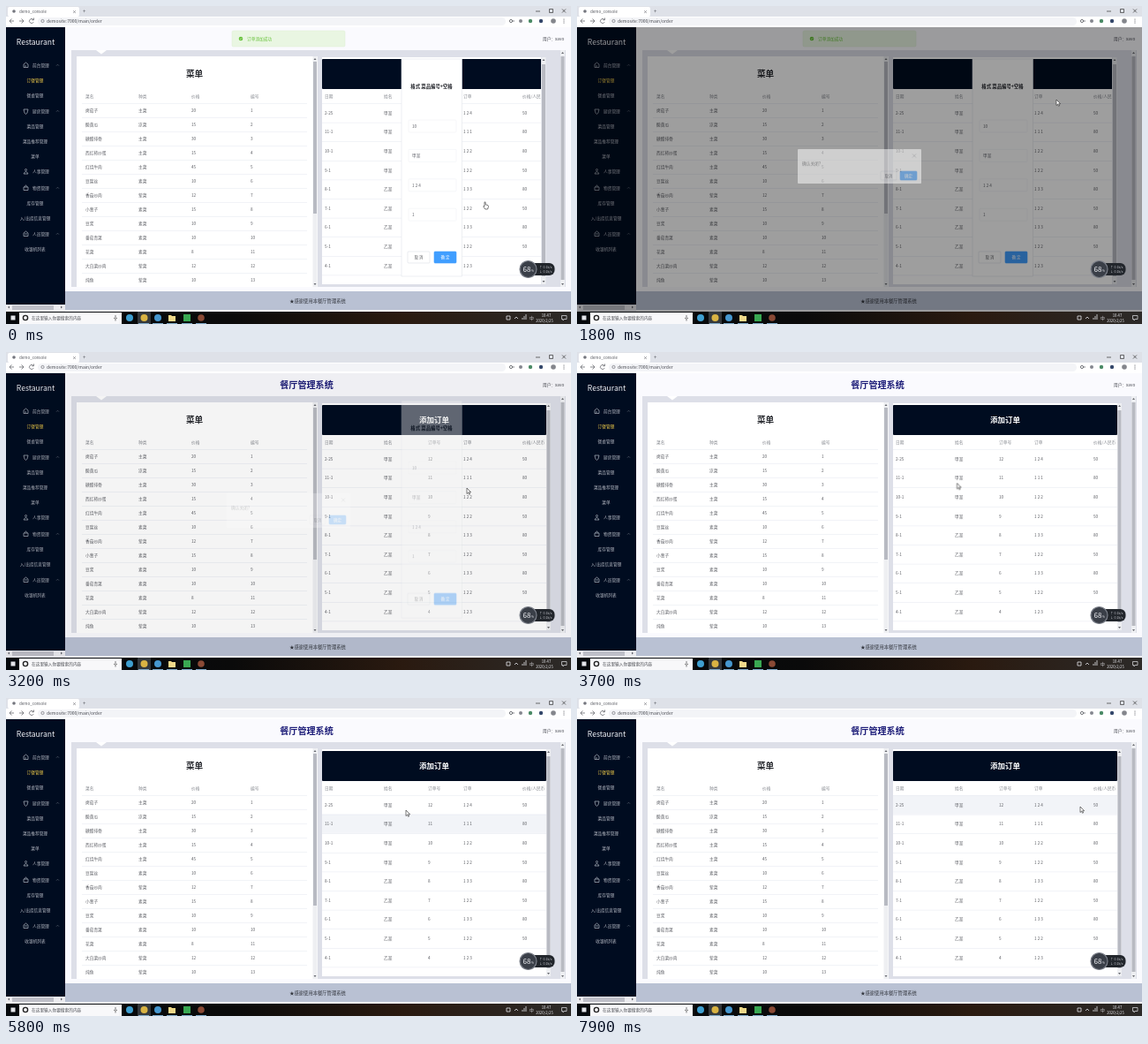
Write an HTML page that moves like this. It is 640x360 px and loops after 8 s.

```html
<!DOCTYPE html>
<html lang="zh-CN">
<head>
<meta charset="utf-8">
<style>
html, body { margin: 0; width: 100%; height: 100%; overflow: hidden; background: #fafafe; }
svg { display: block; width: 640px; height: 360px; }
text { font-family: "Noto Sans CJK SC", "Noto Sans CJK", "Noto Sans", sans-serif; white-space: pre; }
#notice, #form, #narrow, #shade, #confirm, #cursor, #arrow, #hand, #hoverL, #hoverR {
  animation: 8s linear infinite;
}
#notice { animation-name: notice; }
#form { animation-name: form; }
#narrow { animation-name: narrow; animation-timing-function: step-end; }
#shade { animation-name: shade; mix-blend-mode: multiply; }
#confirm { animation-name: confirm; }
#cursor { animation-name: move; animation-timing-function: ease-in-out; }
#arrow { animation-name: arrow; animation-timing-function: step-end; }
#hand { animation-name: hand; animation-timing-function: step-end; }
#hoverL { animation-name: hoverL; }
#hoverR { animation-name: hoverR; }

@keyframes notice {
  0%, 28% { opacity: 1; transform: none; }
  32%, 100% { opacity: 0; transform: translateY(-12px); }
}
@keyframes form {
  0%, 38.2% { opacity: 1; transform: none; }
  41.2%, 100% { opacity: 0; transform: translateY(-8px); }
}
@keyframes narrow { 0% { opacity: 1; } 38.6%, 100% { opacity: 0; } }
@keyframes shade {
  0%, 20.5% { opacity: 0; }
  23.2%, 38.2% { opacity: 1; }
  40.2%, 100% { opacity: 0; }
}
@keyframes confirm {
  0%, 20.5% { opacity: 0; transform: translateY(-8px); }
  24.5%, 38.2% { opacity: 1; transform: none; }
  40.6%, 100% { opacity: 0; transform: translateY(-8px); }
}
@keyframes move {
  0%, 10% { transform: translate(541px, 222px); }
  20%, 24% { transform: translate(543px, 106px); }
  33%, 38.2% { transform: translate(379px, 195px); }
  40%, 42% { transform: translate(522px, 154px); }
  54%, 59% { transform: translate(174px, 133px); }
  69% { transform: translate(440px, 146px); }
  72.5% { transform: translate(453px, 127px); }
  82% { transform: translate(520px, 120px); }
  94%, 100% { transform: translate(570px, 123px); }
}
@keyframes arrow { 0% { opacity: 0; } 12% { opacity: 1; } 32.5% { opacity: 0; } 38.6%, 100% { opacity: 1; } }
@keyframes hand { 0% { opacity: 1; } 12% { opacity: 0; } 32.5% { opacity: 1; } 38.6%, 100% { opacity: 0; } }
@keyframes hoverL {
  0%, 49% { opacity: 0; transform: translateY(16px); }
  50%, 51% { opacity: 1; transform: translateY(16px); }
  51.01%, 63% { opacity: 1; transform: none; }
  65%, 100% { opacity: 0; transform: none; }
}
@keyframes hoverR {
  0%, 65.5% { opacity: 0; transform: translateY(21.6px); }
  67.5%, 72.8% { opacity: 1; transform: translateY(21.6px); }
  72.81%, 100% { opacity: 1; transform: none; }
}
</style>
</head>
<body>
<svg id="stage" viewBox="0 0 640 360"></svg>
<script>
const navy = '#000c20', wall = '#dddfe8', paper = '#ffffff';

const rect = (x, y, w, h, fill, extra = '') =>
  `<rect x="${x}" y="${y}" width="${w}" height="${h}" fill="${fill}" ${extra}/>`;
const dot = (x, y, r, fill, extra = '') =>
  `<circle cx="${x}" cy="${y}" r="${r}" fill="${fill}" ${extra}/>`;
const path = (d, stroke, width = .7, fill = 'none') =>
  `<path d="${d}" stroke="${stroke}" stroke-width="${width}" fill="${fill}"/>`;
// y is the middle of the line of text
const text = (x, y, s, size = 4.7, fill = '#64666e', extra = '') =>
  `<text x="${x}" y="${y + size * .37}" font-size="${size}" fill="${fill}" ${extra}>${s}</text>`;
const mid = 'text-anchor="middle"';
const bold = mid + ' font-weight="700"';
const group = (id, body) => `<g id="${id}">${body}</g>`;
const button = (x, y, w, h, label, main) =>
  rect(x, y, w, h, main ? '#409eff' : paper, `rx="1" stroke="${main ? '#409eff' : '#dcdfe6'}" stroke-width=".6"`) +
  text(x + w / 2, y + h / 2, label, 4.5, main ? '#fff' : '#606266', mid);

function browser() {
  const ink = '#55575e';
  return rect(0, 0, 640, 12, '#dee1e8') + rect(2, 1, 81, 11, paper, 'rx="2"') +
    dot(9, 6, 1.8, '#74767e') + text(15, 6, 'demo_console', 4.5, ink) + text(75, 6, '×', 5, ink) +
    text(87, 6, '+', 6, ink) +
    path('M600 6h5M615.500 3.500h4v4h-4zM630 3.500l4 4m0-4l-4 4', '#333') +
    rect(0, 12, 640, 12, paper) +
    path('M9 17H4m2.500-2.500L4 17l2.500 2.500M15 17h5m-2.500-2.500l2.500 2.500-2.500 2.500', ink) +
    path('M31 15.500a2.500 2.500 0 1 0 .3 2.500M31.500 13.500v2.300h-2.300', ink) +
    rect(36, 13, 530, 9, '#f3f4f7', 'rx="4.5"') + dot(41.5, 17, 1.6, 'none', `stroke="${ink}" stroke-width=".6"`) +
    text(46, 17, 'demosite:7000/main/order', 5, '#494b52') +
    dot(572, 17, 1.6, 'none', `stroke="${ink}" stroke-width=".8"`) + path('M573 17h3', ink) +
    dot(583, 17, 2, '#85878f') + dot(594, 17, 2.2, '#4a8a65') + dot(606, 17, 2.2, '#35486b') +
    dot(620, 17, 2.8, '#84868c') + [15, 17, 19].map(y => dot(632, y, .6, ink)).join('');
}

function sidebar() {
  const heads = [[67, '前台管理', 1], [119, '厨房管理', 1], [187, '人事管理'], [206, '物资管理', 1], [258, '人员管理', 1]];
  const links = [[84, '订餐管理'], [101, '餐桌管理'], [136, '菜品管理'], [153, '菜品推荐管理'], [170, '菜单'],
    [223, '库存管理'], [240, '入/出库信息管理'], [275, '收银机列表']];
  const icons = ['M20 66l2.500-2 2.500 2v3.500h-5zM22 69v-2', 'M20 117h5l-1 4-1.500 1.500-1.500-1.500z',
    'M20 190q2.500-5 5 0zM21.500 185.500a1 1 0 1 1 2 0a1 1 0 1 1-2 0', 'M20 205h5v3.500h-5zM21 205q1.500-4 3 0',
    'M20 257l2.500-2 2.500 2v3.500h-5zM21 258h3'];
  const pale = '#b4b8c2';
  return rect(0, 24, 67, 314, navy) +
    text(33.5, 41, 'Restaurant', 8.6, '#f4f5fa', mid) +
    heads.map(([y, s, caret], i) => path(icons[i], pale, .7) + text(30, y, s, 4.7, pale) +
      (caret ? path(`M57 ${y + .7}l1.500-1.500 1.500 1.500`, '#777c88', .5) : '')).join('') +
    links.map(([y, s], i) => text(33, y, s, 4.7, i ? pale : '#f5d04b', mid)).join('') +
    rect(0, 338, 67, 8, '#ececf0') + rect(7, 339, 47, 5, '#bfc0c8') +
    path('M4 339.500l-2 1.500 2 1.500zM62 339.500l2 1.500-2 1.500z', 'none', 0, '#66686e');
}

function scrollbar(x, y, h, from, to) {
  return rect(x, y, 5, h, '#eeeff2') + rect(x + .5, from, 4, to - from, '#b8bac2') +
    path(`M${x + 1} ${y + 4}l1.500-2 1.500 2zM${x + 1} ${y + h - 4}l1.500 2 1.500-2z`, 'none', 0, '#66686e');
}

function table(cols, head, rows, x, right, top, step, headLine) {
  const cells = (row, y, fill) => row.map((s, i) => text(cols[i], y, s, 4.7, fill)).join('');
  const line = y => rect(x, y, right - x, .6, '#e8ebf2');
  return cells(head, 102, '#85888f') + line(headLine) + rows.map((row, i) => {
    const y = top + i * step;
    return cells(row, y, '#606268') + (y + step / 2 < 316 ? line(y + step / 2) : '');
  }).join('');
}

function menu() {
  const dishes = ('烤茄子 主菜 20,酸黄瓜 凉菜 15,糖醋排骨 主菜 30,西红柿炒蛋 主菜 15,红烧牛肉 主菜 45,豆腐丝 素菜 10,' +
    '香菇炒肉 荤菜 12,小葱子 素菜 15,豆浆 素菜 10,番茄青菜 素菜 10,花菜 素菜 8,大白菜炒肉 荤菜 12,炖鱼 荤菜 10')
    .split(',').map((s, i) => [...s.split(' '), i + 1]);
  return rect(80, 57, 273, 261, paper) + group('hoverL', rect(86, 126, 255, 16, '#f3f5f9')) +
    text(213.5, 76, '菜单', 9.6, '#24262c', bold) +
    table([90, 150, 210, 277], ['菜名', '种类', '价格', '编号'], dishes, 86, 341, 118, 16, 110) +
    scrollbar(347.5, 57, 261, 63, 235);
}

function orders() {
  const sets = ['1 2 4', '1 1 1', '1 2 2', '1 2 2', '1 3 3', '1 2 2', '1 3 3', '1 2 2', '1 2 3'];
  const prices = [50, 80, 80, 50, 80, 50, 80, 50, 50];
  const rows = sets.map((s, i) =>
    [i ? `${12 - i}-1` : '2-25', i < 4 ? '甲某' : '乙某', 12 - i, s, prices[i]]);
  return rect(358, 58, 259, 257, paper) + group('hoverR', rect(358, 110, 254, 21.6, '#f2f4f8')) +
    table([361, 428, 478, 518, 585], ['日期', '姓名', '订单号', '订单', '价格/人民币'], rows, 358, 612, 121, 21.6, 110) +
    scrollbar(612, 58, 257, 66, 306) +
    rect(358, 60, 254, 34, navy, 'rx="1"') + text(485, 77, '添加订单', 8.5, '#fff', bold);
}

// While the form is open the order list loses the width of one scrollbar
const narrow = () => rect(606, 58, 11, 257, wall) + scrollbar(606.5, 58, 257, 66, 306);

function form() {
  const fields = ['10', '甲某', '1 2 4', '1'];
  return rect(448, 60, 68.5, 246, paper, 'stroke="#e2e4ea" stroke-width=".6"') +
    text(482, 91, '格式 菜品编号+空格', 5.4, '#24262c', bold) +
    fields.map((s, i) => {
      const y = 136 + i * 33.4;
      return rect(456, y - 7, 54, 14, paper, 'rx="1" stroke="#eceef3" stroke-width=".5"') + text(460, y, s);
    }).join('') +
    button(455, 278, 25, 13, '取 消') + button(485, 278, 25, 13, '确 定', true);
}

const notice = () => rect(256, 28, 128, 18, '#e9f6e2', 'rx="1.5" stroke="#dcefd2" stroke-width=".5"') +
  dot(266, 37, 2.3, '#67c23a') + path('M265 37l.8.8 1.500-1.600', '#fff', .5) +
  text(273, 37, '订单添加成功', 4.7, '#67c23a');

const confirmBox = () => rect(250, 166, 140, 39, paper, 'rx="1"') +
  path('M380 171.500l4 4m0-4l-4 4', '#909399', .5) + text(255, 182, '确认关闭？', 4.7, '#606266') +
  button(344, 191, 18, 10, '取消') + button(366, 191, 19, 10, '确定', true);

function page() {
  return rect(0, 24, 640, 322, '#fafafe') +
    text(340.5, 37.5, '餐厅管理系统', 10.1, '#1c1c78', bold) +
    text(608, 37, '用户：xavo', 4.7, '#484a52') +
    rect(74, 50, 560, 268, wall) + path('M102 50h12l-6 4.500z', 'none', 0, paper) +
    menu() + orders() + group('narrow', narrow()) + scrollbar(628, 50, 268, 57, 310) +
    rect(67, 323, 573, 21, '#b9c1d3') + text(353, 334, '★感谢使用本餐厅管理系统', 5.3, '#33363e', mid) +
    sidebar();
}

function taskbar() {
  const pale = '#e4e5ea';
  return '<linearGradient id="bar"><stop stop-color="#04080c"/><stop offset=".4" stop-color="#0a0a0a"/>' +
    '<stop offset=".7" stop-color="#2a1a10"/><stop offset="1" stop-color="#2c2a28"/></linearGradient>' +
    rect(0, 346, 640, 14, 'url(#bar)') + rect(5.5, 350.5, 5, 5, pale) +
    rect(15, 347, 116, 13, '#f8f8fa') + dot(22, 353, 2.6, 'none', 'stroke="#222" stroke-width="1.4"') +
    text(29, 353, '在这里输入你要搜索的内容', 4.7, '#4a4c52') +
    path('M124 350v3.500M122 353q2 3 4 0M124 355v1.500', '#444') +
    dot(140, 353, 4, '#3f9fd0') + rect(149, 346, 15, 14, '#34383c') + dot(156.5, 353, 4, '#d9b343') +
    dot(172, 353, 4, '#4697cf') +
    path('M184 350h3l1 1h4v6h-8z', 'none', 0, '#f0d98a') + rect(201, 349, 8, 8, '#39a852') + dot(221, 353, 3.8, '#8a4a35') +
    [156, 172, 188, 205, 221].map(x => rect(x - 6, 359, 12, 1, '#7fa9c8')).join('') +
    path('M567 351h4v4h-4zM576 354l2-2 2 2M585 355v-2m2 2v-4m2 4v-6', pale, .8) +
    text(593, 353, '中', 4.8, pale) + text(612, 350, '10:47', 4.2, pale, mid) + text(610, 356, '2020/2/25', 4.2, pale, mid) +
    path('M629.500 350.500h5.500v4h-3l-1 1.500v-1.500h-1.500z', pale);
}

const meter = () => rect(592, 291, 29.500, 14, '#22262c', 'rx="6"') +
  text(604, 295.5, '↑ 0.1k/s', 3.6, '#c8cad0') + text(604, 301, '↓ 0.2k/s', 3.6, '#c8cad0') +
  dot(591.5, 298, 9.5, '#3a3f48', 'stroke="#7c808a" stroke-width="1.2"') +
  text(590, 298, '68', 8, '#f0f1f5', mid) + text(595, 300, '%', 3.2, '#f0f1f5');

const cursor = () =>
  group('arrow', path('M0 0v6.500l1.600-1.400 1 2.200 1-.5-1-2.100h2z', '#222', .6, '#fff')) +
  group('hand', path('M1 0q1-.6 1.200.6v2.200l2.800.8q.8.4.4 2l-.8 2.400H1.800L-.3 5q0-1 1.300-.3z', '#222', .6, '#fff'));

document.getElementById('stage').innerHTML =
  page() + group('form', form()) + group('notice', notice()) +
  rect(0, 24, 640, 322, '#7c7c7c', 'id="shade"') +
  group('confirm', confirmBox()) + browser() + taskbar() + meter() + group('cursor', cursor());
</script>
</body>
</html>
```
